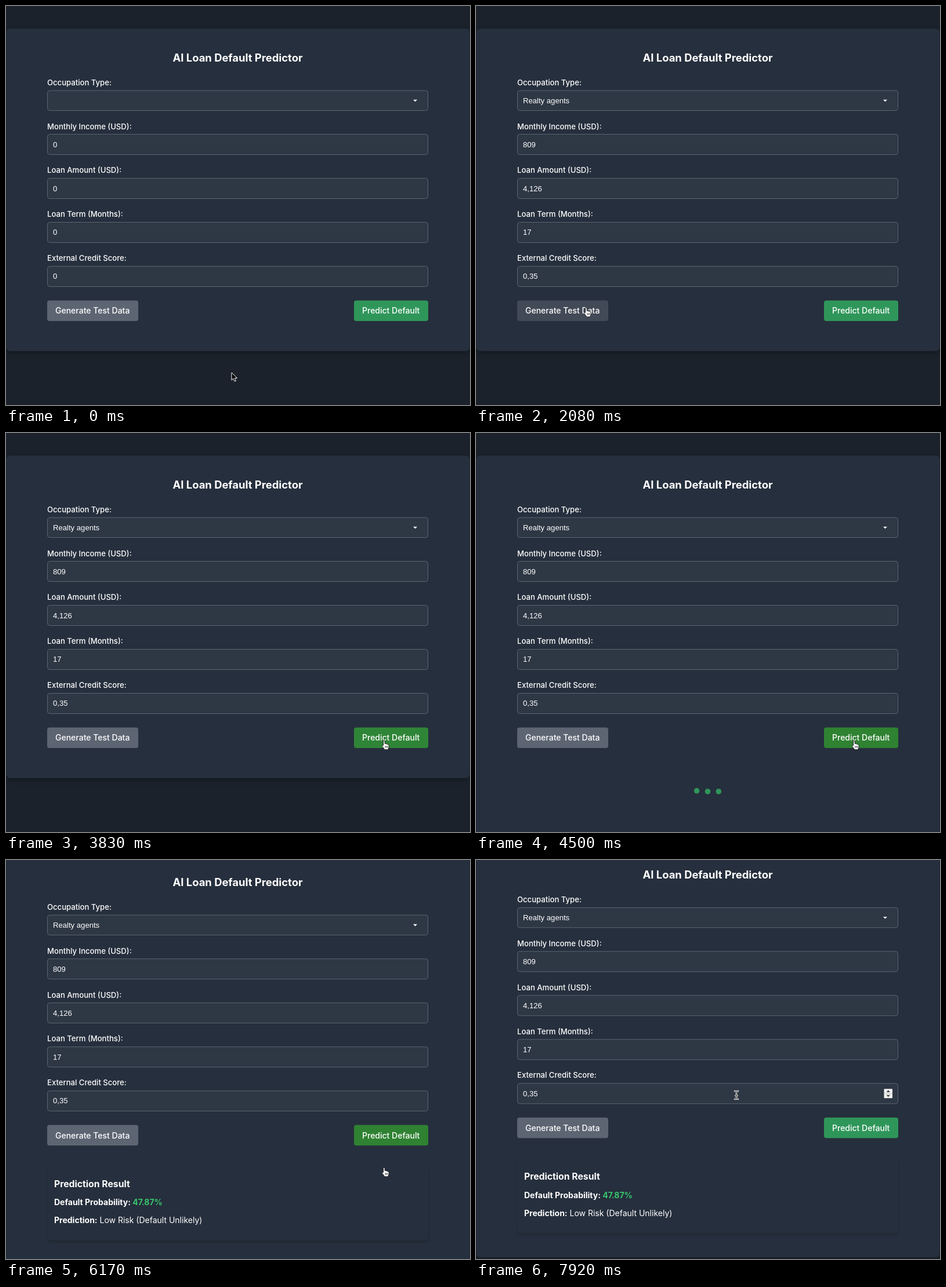
An HTML page for the animation above (8000 ms loop, 800 by 689 pixels).

```html
<!DOCTYPE html>
<html lang="en">
<head>
<meta charset="utf-8">
<title>Loan form</title>
<style>
  html, body { margin: 0; width: 100%; height: 100%; overflow: hidden; background: #1b222b; }
  svg { display: block; width: 800px; height: 689px; }
  text { fill: #fff; font-family: Inter, sans-serif; font-optical-sizing: none; }
  .title { font-size: 18.4px; font-weight: 700; text-anchor: middle; }
  .label { font-size: 13.125px; font-weight: 500; }
  .value { font-size: 13.125px; font-family: "Liberation Sans", Arial, sans-serif; }
  .button { font-size: 14px; font-weight: 500; }
  .heading { font-size: 15.75px; font-weight: 700; }
  .line { font-size: 14px; }
  .bold { font-weight: 700; }
  .rate { fill: #37c56c; }
  .card { fill: #262f3d; filter: drop-shadow(0 3px 4px rgba(0, 0, 0, .3)); }
  .panel { fill: #262f3d; filter: drop-shadow(0 3px 2px rgba(0, 0, 0, .16)); }
  .field { fill: #2e3744; stroke: #5b6472; }
</style>
</head>
<body>
<svg id="stage" viewBox="0 0 800 689">
  <g id="page">
    <rect id="card" class="card" x=".5" y="39" width="799" height="557" rx="7"/>
    <text class="title" x="399.5" y="95.7">AI Loan Default Predictor</text>
    <g id="form"></g>
    <path d="M702 161.7h7l-3.5 3.6z" fill="#fff"/>
    <rect id="generate" x="71" y="508.5" width="157" height="35.5" rx="4"/>
    <text class="button" x="85" y="531.4">Generate Test Data</text>
    <rect id="predict" x="600" y="508.5" width="128" height="35.5" rx="4"/>
    <text class="button" x="614" y="531.4">Predict Default</text>
    <g id="loader" fill="#2f965a">
      <circle cx="380.6" r="4.8"/><circle cx="399.5" r="4.8"/><circle cx="418.3" r="4.8"/>
    </g>
    <g id="result">
      <rect class="panel" x="71" y="580" width="657" height="128" rx="7"/>
      <text class="heading" x="83" y="616">Prediction Result</text>
      <text class="line" x="83" y="647.3"><tspan class="bold">Default Probability: <tspan class="rate">47.87%</tspan></tspan></text>
      <text class="line" x="83" y="678.3"><tspan class="bold">Prediction:</tspan> Low Risk (Default Unlikely)</text>
    </g>
    <g id="spinner">
      <rect x="703.5" y="459" width="14.5" height="16" rx="1" fill="#f1f1f1"/>
      <path d="M707.5 464.6h6.5l-3.2-3.6zM707.5 469.4h6.5l-3.2 3.6z" fill="#444"/>
      <path d="M703.5 467h14.5" stroke="#bbb" stroke-width=".8"/>
    </g>
  </g>
  <g id="cursor">
    <path id="arrow" d="M0 0v13.2l3-2.8 2 4.8 2.3-.9-2-4.7h4.2z" fill="#000" stroke="#fff"/>
    <path id="hand" d="M-1.5 8.6V1.2a1.3 1.3 0 0 1 2.6 0V5.4q1.9-.8 2.5.7q1.9-.5 2.4.8q2.2-.3 2.2 1.6v2.4q0 1.8-1.2 3.4v1.5H.5q-.5-1.9-2-3.4l-2.2-3q.5-1.8 2.2-.8zM2 9.5v3M4 9.5v3M6 9.5v3"
      fill="#fff" stroke="#111" stroke-width=".9"/>
    <g id="beam" fill="none" stroke-linecap="round">
      <path d="M-3-7q3 0 3 2q0-2 3-2M0-5V5M-3 7q3 0 3-2q0 2 3 2M-1.5 1h3" stroke="#fff" stroke-width="2.6"/>
      <path d="M-3-7q3 0 3 2q0-2 3-2M0-5V5M-3 7q3 0 3-2q0 2 3 2M-1.5 1h3" stroke="#222" stroke-width=".9"/>
    </g>
  </g>
</svg>
<script>
const LOOP = 8000;
const FILLED = 1500, LOADING = 4420, RESULT = 5910, SCROLL = 5930;
const $ = id => document.getElementById(id);

const fields = [
  ['Occupation Type:', '', 'Realty agents'],
  ['Monthly Income (USD):', '0', '809'],
  ['Loan Amount (USD):', '0', '4,126'],
  ['Loan Term (Months):', '0', '17'],
  ['External Credit Score:', '0', '0,35']
];
$('form').innerHTML = fields.map(([label], i) => {
  const y = i ? 145.5 + 76 * i : 146;
  return `<text class="label" x="71" y="${136.6 + 75.9 * i}">${label}</text>
    <rect class="field" x="71.5" y="${y}" width="656" height="${i ? 35 : 34.5}" rx="4"/>
    <text class="value" x="81" y="${167.7 + 75.9 * i}"></text>`;
}).join('');
const values = document.querySelectorAll('.value');
const dots = document.querySelectorAll('#loader circle');

// time, x, y of the pointer
const path = [
  [0, 389, 633], [150, 389, 633], [950, 190, 521], [2750, 190, 521],
  [3000, 358, 543], [3100, 358, 543], [3800, 652, 531], [6900, 652, 531],
  [7500, 449, 406], [LOOP, 449, 406]
];
const shapes = [
  [0, 'arrow'], [720, 'hand'], [2828, 'arrow'], [3600, 'hand'],
  [6920, 'arrow'], [7360, 'beam']
];

const clamp = v => Math.min(1, Math.max(0, v));
const smooth = p => p * p * (3 - 2 * p);
const easeInOut = p => p < .5 ? 4 * p ** 3 : 1 - 4 * (1 - p) ** 3;
const show = (id, on) => $(id).setAttribute('visibility', on ? 'visible' : 'hidden');
const hover = (t, from, to) => smooth(clamp((t - from) / 300)) - smooth(clamp((t - to) / 300));
const mix = (a, b, p) => `rgb(${a.map((v, i) => Math.round(v + (b[i] - v) * p))})`;

function pointer(t) {
  const i = path.findIndex(k => k[0] > t);
  const [t0, x0, y0] = path[i - 1], [t1, x1, y1] = path[i];
  const p = smooth((t - t0) / (t1 - t0));
  return [x0 + (x1 - x0) * p, y0 + (y1 - y0) * p];
}

// one hop in the first 1120 ms of each 1400 ms
function bounce(t) {
  const phase = t < 0 ? 0 : t % 1400;
  return 20 * smooth(clamp(1 - Math.abs(phase - 560) / 560));
}

function draw(t) {
  const scroll = 63.7 * easeInOut(clamp((t - SCROLL) / 382));
  $('page').setAttribute('transform', `translate(0 ${-scroll})`);
  $('card').setAttribute('height', t < LOADING ? 557 : t < RESULT ? 665 : 711);

  values.forEach((node, i) => node.textContent = fields[i][t < FILLED ? 1 : 2]);
  $('generate').setAttribute('fill', mix([93, 101, 114], [67, 74, 87], hover(t, 720, 2828)));
  $('predict').setAttribute('fill', mix([47, 150, 90], [47, 130, 50], hover(t, 3600, 6920)));

  show('loader', t >= LOADING && t < RESULT);
  dots.forEach((dot, i) => dot.setAttribute('cy', 619 - bounce(t - LOADING - 200 * i)));
  show('result', t >= RESULT);

  const shape = shapes.filter(s => s[0] <= t).pop()[1];
  for (const id of ['arrow', 'hand', 'beam']) show(id, id === shape);
  show('spinner', shape === 'beam');
  $('cursor').setAttribute('transform', `translate(${pointer(t)})`);
}

function tick() {
  draw(performance.now() % LOOP);
  requestAnimationFrame(tick);
}
tick();
</script>
</body>
</html>
```
